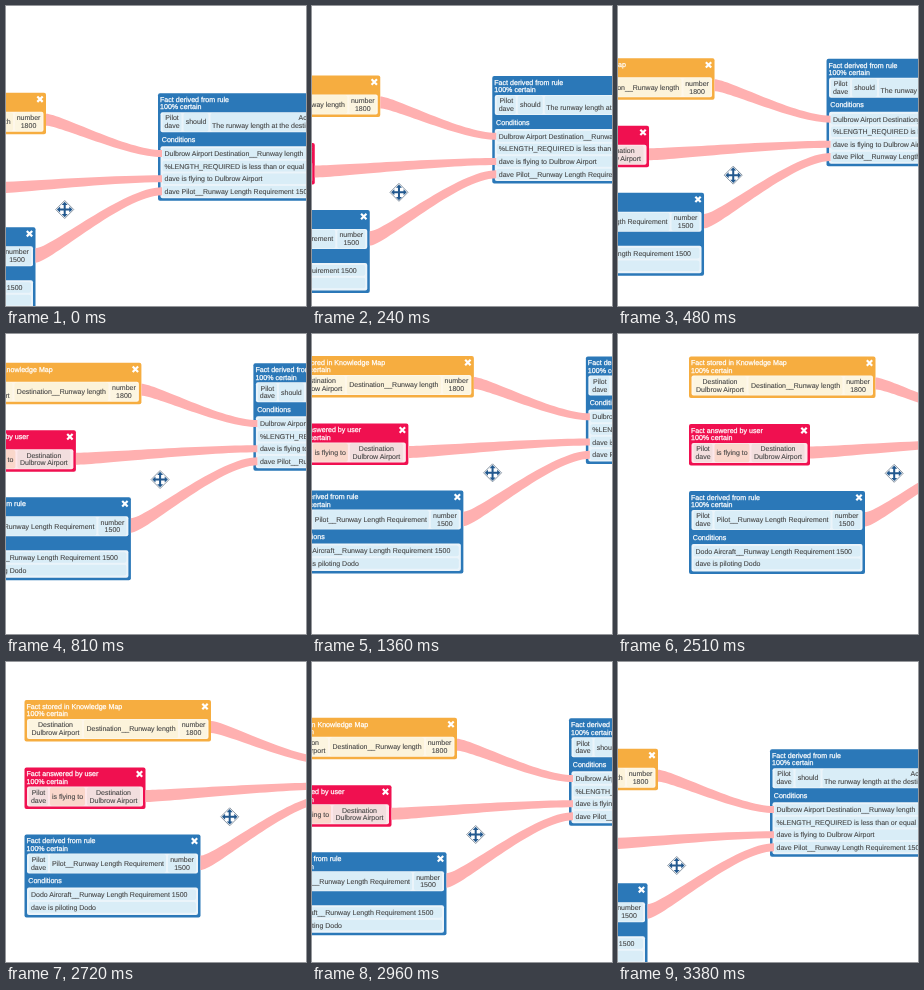
These frames come from a looping animation (300x300 px, 3710 ms). An HTML page:

```html
<!DOCTYPE html>
<html lang="en">
<head>
<meta charset="utf-8">
<title>Panning a fact graph</title>
<style>
html, body { margin: 0; width: 100%; height: 100%; overflow: hidden; background: #fff; }
svg { display: block; width: 100vw; height: 100vh; }
text {
  font: 7px "Liberation Sans", Arial, sans-serif; fill: #444;
  stroke: #444; stroke-width: 0.1; text-rendering: geometricPrecision;
}
.head { font-size: 7.1px; fill: #fff; stroke: #fff; stroke-width: 0.25; }
</style>
</head>
<body>
<svg viewBox="0 0 300 300"><g id="world"></g></svg>
<script>
const world = document.getElementById('world');

function add(tag, attrs, content = '') {
  const el = document.createElementNS('http://www.w3.org/2000/svg', tag);
  for (const k in attrs) el.setAttribute(k, attrs[k]);
  el.textContent = content;
  world.append(el);
}
const rect = (x, y, width, height, fill, rx = 2) => add('rect', { x, y, width, height, fill, rx });
const label = (x, y, s, attrs = {}) => add('text', { x, y, ...attrs }, s);

const ORANGE = { main: '#f6ad40', panel: '#fef7ea', cell: '#fcf5e0', link: '#fcf3da' };
const RED = { main: '#f01050', panel: '#fde7ea', cell: '#f2dede', link: '#fad7cb' };
const BLUE = { main: '#2b78b8', panel: '#ebf4fa', cell: '#d9edf7', link: '#d9edf7' };

// cells: [left, width, line, line]; a single line is a relation
function card(x, y, w, h, skin, title, cells, conditions = []) {
  const head = { class: 'head' };
  rect(x, y, w, h, skin.main);
  label(x + 2, y + 8.8, title, head);
  label(x + 2, y + 16.3, '100% certain', head);
  const cx = x + w - 6, cy = y + 6.5;
  add('path', {
    d: `M${cx - 2.7} ${cy - 2.7}l5.4 5.4m0-5.4l-5.4 5.4`,
    stroke: '#fff', 'stroke-width': 2.2
  });
  rect(x + 2.5, y + 19, w - 5, 20, skin.panel);
  for (const [left, width, ...lines] of cells) {
    const single = lines.length === 1;
    rect(x + left, y + 19.8, width, 18.4, single ? skin.link : skin.cell);
    lines.forEach((s, i) => label(x + left + width / 2, y + (single ? 31.3 : 27.3 + i * 7.9), s,
      { 'text-anchor': 'middle' }));
  }
  if (!conditions.length) return;
  label(x + 3.8, y + 48.6, 'Conditions', head);
  rect(x + 2.5, y + 53, w - 5, h - 55.5, skin.panel);
  conditions.forEach((s, i) => {
    const mid = y + 60.3 + i * 12.6;
    rect(x + 4.5, mid - 5.3, w - 9, 10.6, skin.cell);
    label(x + 6.5, mid + 2.5, s);
  });
}

// Band that narrows from a card's right edge and levels out at a condition
function band(x1, y1, x2, y2, r1 = 6, r2 = 3.5) {
  const a = x1 + (x2 - x1) * 0.12, b = x2 - (x2 - x1) * 0.3;
  add('path', {
    d: `M${x1} ${y1 - r1}C${a} ${y1 - r1} ${b} ${y2 - r2} ${x2} ${y2 - r2}` +
       `V${y2 + r2}C${b} ${y2 + r2} ${a} ${y1 + r1} ${x1} ${y1 + r1}Z`,
    fill: '#ffb0b0'
  });
}

function cursor(x, y) {
  add('path', {
    d: `M${x} ${y - 9}l9 9l-9 9l-9-9z`,
    fill: '#fff', stroke: '#8794a2', 'stroke-width': 1, 'stroke-linejoin': 'round'
  });
  for (const angle of [0, 90, 180, 270]) add('path', {
    d: 'M-1 0V-4.6H-3L0-7.8L3-4.6H1V0Z',
    transform: `translate(${x} ${y}) rotate(${angle})`,
    fill: '#22588e'
  });
}

const PLACE = 'Dulbrow Airport';

card(71, 22.5, 186.5, 41.5, ORANGE, 'Fact stored in Knowledge Map', [
  [4.5, 53, 'Destination', PLACE],
  [59.5, 94, 'Destination__Runway length'],
  [155.5, 27, 'number', '1800']
]);
card(71, 90, 121, 41.5, RED, 'Fact answered by user', [
  [4.5, 19, 'Pilot', 'dave'],
  [25.5, 35, 'is flying to'],
  [62.5, 53, 'Destination', PLACE]
]);
card(71, 157, 176, 83, BLUE, 'Fact derived from rule', [
  [4.5, 19, 'Pilot', 'dave'],
  [25.5, 116, 'Pilot__Runway Length Requirement'],
  [143.5, 28, 'number', '1500']
], ['Dodo Aircraft__Runway Length Requirement 1500', 'dave is piloting Dodo']);
card(369.5, 23, 300, 107.5, BLUE, 'Fact derived from rule', [
  [4.5, 19, 'Pilot', 'dave'],
  [25.5, 25, 'should'],
  [52.5, 240, '', '']
], [
  PLACE + ' Destination__Runway length',
  '%LENGTH_REQUIRED is less than or equal to',
  'dave is flying to ' + PLACE,
  'dave Pilot__Runway Length Requirement 1500'
]);
label(510, 50.3, 'Action');
label(423.5, 57.4, 'The runway length at the destination');

band(257.5, 49.5, 373.5, 83.3);
band(192, 118.5, 373.5, 108.5);
band(247, 185.3, 373.5, 121.1, 7.2, 4);
cursor(276.2, 139.3);

// Straight drags between three resting places, in 30 ms steps
const LOOP = 3710, LEG = 1240, STEP = 30, STEPS = 30;
const stops = [[-217.5, 64.2], [-111.5, -0.2], [7.5, -2.2]];

function draw(now) {
  const t = (now + 0.5) % LOOP;
  const leg = Math.floor(t / LEG);
  const p = Math.min(STEPS, Math.floor((t - leg * LEG) / STEP)) / STEPS;
  const from = stops[leg], to = stops[(leg + 1) % 3];
  const [x, y] = from.map((v, i) => v + (to[i] - v) * p);
  world.setAttribute('transform', `translate(${x} ${y})`);
}

let start;
function tick(now) {
  start ??= now;
  draw(now - start);
  requestAnimationFrame(tick);
}
draw(0);
requestAnimationFrame(tick);
</script>
</body>
</html>
```
